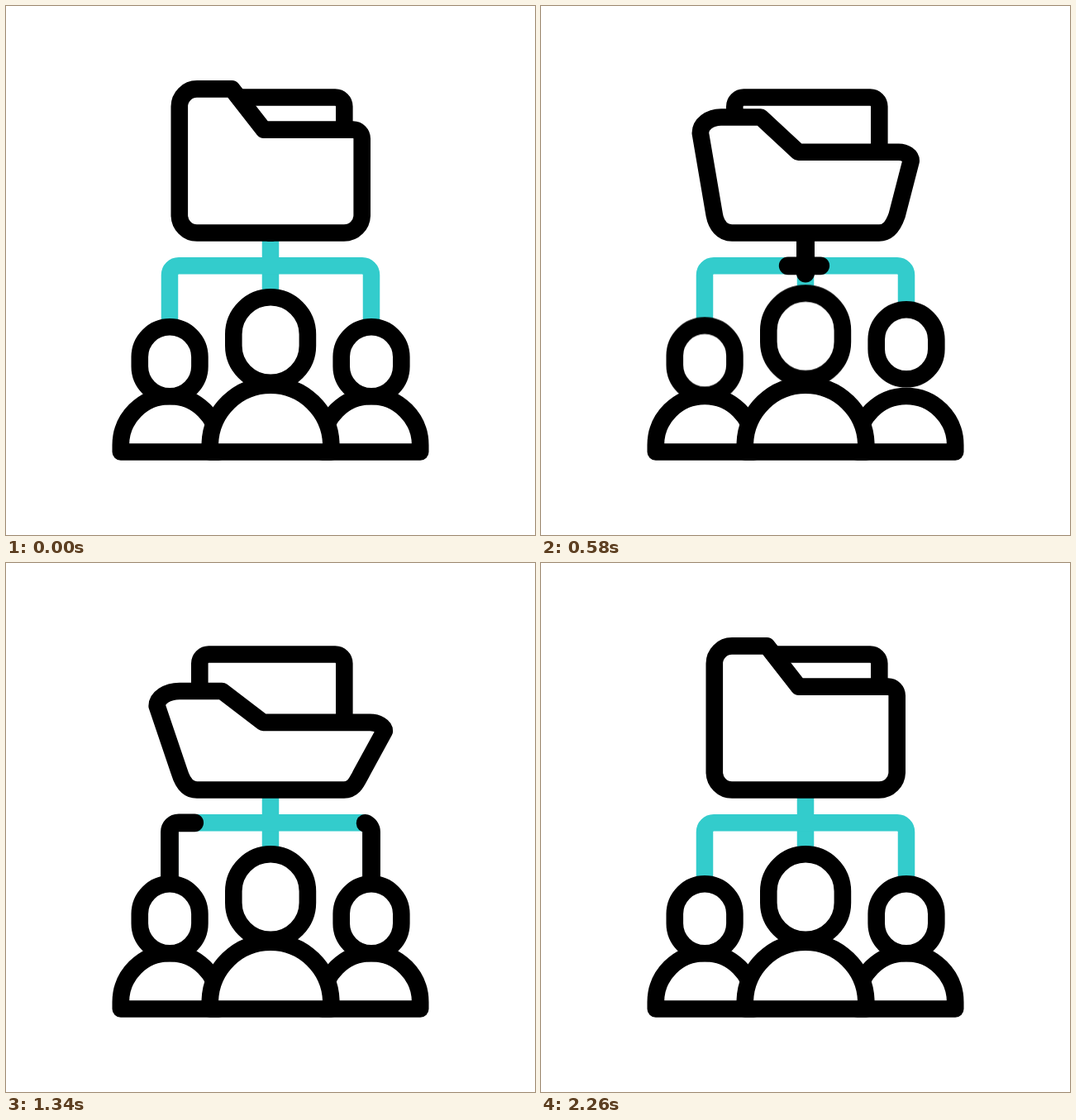
Write an HTML page that moves like this. It is 640 px wide and 640 px high and loops after 2400 ms.

```html
<!DOCTYPE html>
<html lang="en">
<head>
<meta charset="utf-8">
<title>Shared folder</title>
<style>
@property --from { syntax: "<number>"; inherits: false; initial-value: 0; }
@property --to { syntax: "<number>"; inherits: false; initial-value: 0; }

html, body { margin: 0; width: 100%; height: 100%; overflow: hidden; background: #fff; }
svg { display: block; width: 100vw; height: 100vh; }

.ink { fill: #fff; stroke: #000; stroke-width: 20.6; stroke-linejoin: round; }
.teal { fill: none; stroke: #33cccc; stroke-width: 20.5; }

.move {
  animation: 2400ms cubic-bezier(.333, 0, .667, 1) infinite both;
}

/* a stroke visible only between --from and --to */
.trim {
  fill: none;
  stroke-linecap: round;
  stroke-dasharray: calc(var(--to) - var(--from)) 3;
  stroke-dashoffset: calc(-1 * var(--from));
}
.wire { stroke: #000; stroke-width: 21.8; }

.front { animation-name: fold; animation-timing-function: cubic-bezier(.667, 0, .333, 1); }
.head-l, .head-c { animation-name: bob; }
.head-c { animation-delay: 37ms; }
.head-r { animation-name: nod; }
.wire-l { animation-name: wire-l; }
.wire-c { animation-name: wire-c; }
.wire-r { animation-name: wire-r; }
.spark { animation-name: spark; }

@keyframes fold {
  0%, 93.75%, 100% {
    d: path("M273.3 100.4 L231 100.4 C219.2 100.4 209.8 110 209.8 121.6 L209.8 253 C209.8 264.9 219.4 274.5 231 274.5 L409 274.5 C421 274.5 430.7 264.9 430.7 253 L430.7 160.5 C430.7 154.4 425.8 149.6 420 149.6 L311.8 149.6 Z");
  }
  45%, 48.54% {
    d: path("M261 156.3 L209.5 156.3 C194 156.3 182 164.5 182 174.3 L209.8 253 C213.5 264.9 219.4 274.5 231 274.5 L409 274.5 C421 274.5 424 264.9 430.7 253 L458.5 204.5 C458.5 198.5 450 194 441 194 L311 194 Z");
  }
}
@keyframes bob {
  0%, 26.25%, 52.5%, 100% { transform: translateY(0); }
  13.125%, 39.375% { transform: translateY(-25.9px); }
}
@keyframes nod {
  0%, 5.71%, 37.96%, 100% { transform: translateY(0); }
  21.83% { transform: translateY(-22.3px); }
}
@keyframes wire-l {
  0%, 15.25% { --to: 0; }
  41.5%, 100% { --to: 1; }
  0%, 41.5% { --from: 0; }
  67.5%, 100% { --from: 1; }
}
@keyframes wire-c {
  0%, 10.46% { --to: 0; }
  34.6%, 100% { --to: 1; }
  0%, 34.6% { --from: 0; }
  56.7%, 100% { --from: 1; }
}
@keyframes wire-r {
  0%, 13.17% { --to: 0; }
  46.5%, 100% { --to: 1; }
  0%, 38.4% { --from: 0; }
  66.5%, 100% { --from: 1; }
}
@keyframes spark {
  0%, 29.58% { --to: 0; }
  44.2%, 100% { --to: 1; }
  0%, 37.5% { --from: 0; }
  53.3%, 100% { --from: 1; }
  0%, 29.58%, 53.31%, 100% { opacity: 0; }
  29.59%, 53.3% { opacity: 1; }
}
</style>
</head>
<body>
<svg viewBox="0 0 640 640">
  <!-- connectors -->
  <g class="teal">
    <path d="M320 274V356"/>
    <path d="M198 385V325.3A11 11 0 0 1 209 314.3H431A11 11 0 0 1 442 325.3V385"/>
  </g>
  <path class="trim wire move wire-c" pathLength="1" d="M320 274V356"/>
  <path class="trim wire move wire-l" pathLength="1" d="M320 274V314.3H209A11 11 0 0 0 198 325.3V385"/>
  <path class="trim wire move wire-r" pathLength="1" d="M320 274V314.3H431A11 11 0 0 1 442 325.3V385"/>

  <!-- folder -->
  <path class="ink" d="M234.3 230V121.5A11 11 0 0 1 245.3 110.5H398.3A11 11 0 0 1 409.3 121.5V230"/>
  <path class="ink move front"/>

  <!-- sparks -->
  <g class="teal">
    <path class="trim move spark" pathLength="1" d="M380.7 80L366 44.5"/>
    <path class="trim move spark" pathLength="1" d="M420 87.5L441 51"/>
    <path class="trim move spark" pathLength="1" d="M448.5 116.2L484 104.5"/>
  </g>

  <!-- people -->
  <g class="ink">
    <path d="M138.8 539.5V531.3A59.3 59.3 0 0 1 257.4 531.3V539.5Z"/>
    <path d="M382.6 539.5V531.3A59.3 59.3 0 0 1 501.2 531.3V539.5Z"/>
    <rect class="move head-l" x="161.8" y="388.3" width="72.6" height="84" rx="36.3"/>
    <rect class="move head-r" x="405.7" y="388.3" width="72.6" height="84" rx="36.3"/>
    <path d="M246.8 539.5V529.3A73.3 73.3 0 0 1 393.3 529.3V539.5Z"/>
    <rect class="move head-c" x="275.3" y="352.3" width="89.6" height="103.6" rx="44.8"/>
  </g>
</svg>
</body>
</html>
```
